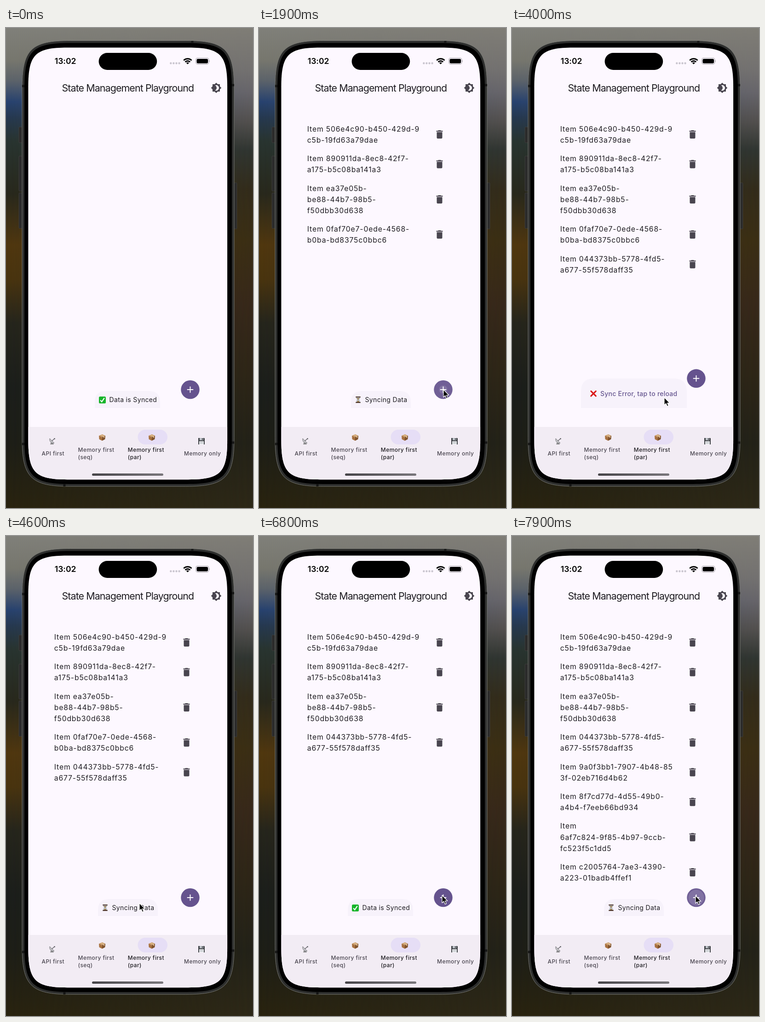
Write an HTML page that moves like this. It is 537 px wide and 1042 px high and loops after 8000 ms.

```html
<!DOCTYPE html>
<html lang="en">
<head>
<meta charset="utf-8">
<title>State Management Playground</title>
<style>
html, body { margin: 0; width: 100%; height: 100%; overflow: hidden; }
body {
  background: linear-gradient(#80807a 0, #77776e 70px, #5b626a 115px, #27426f 160px, #25384f 195px, #283430 245px,
    #28281c 360px, #50370f 470px, #49340f 545px, #25251c 640px, #1b1e1b 780px, #1d1e17 900px, #29230f 1042px);
}
#side {
  position: absolute; inset: 0;
  background: linear-gradient(#7f7d76 0, #737170 90px, #67656a 140px, #524f4d 205px, #303531 265px,
    #332c1b 350px, #3a2e14 460px, #37281a 600px, #2e2617 750px, #232218 900px, #2d2817 1042px);
  -webkit-mask-image: linear-gradient(90deg, transparent, #000);
  mask-image: linear-gradient(90deg, transparent, #000);
}
svg { position: absolute; left: 0; top: 0; display: block; }
text { font-family: Inter, "Open Sans", sans-serif; fill: #1d1b20; font-feature-settings: "calt" 0; }
.title { font-size: 21.4px; letter-spacing: -.89px; }
.clock { font-size: 17.5px; font-weight: 600; fill: #000; }
.item { font-size: 15.7px; letter-spacing: .86px; }
.note { font-size: 14px; letter-spacing: .34px; }
.link { font-size: 14px; letter-spacing: .24px; font-weight: 500; fill: #65558f; }
.tab { font-size: 12px; letter-spacing: .46px; font-weight: 500; fill: #49454f; }
.on { fill: #1d1b20; }
</style>
</head>
<body>
<div id="side"></div>
<svg width="537" height="1042" viewBox="0 0 537 1042">
  <defs>
    <linearGradient id="bar"><stop stop-color="#464448"/><stop offset="1" stop-color="#79767b"/></linearGradient>
    <path id="bin" d="M6 19c0 1.1.9 2 2 2h8c1.1 0 2-.9 2-2V7H6zM19 4h-3.5l-1-1h-5l-1 1H5v2h14z" fill="#49454f"/>
    <g id="box">
      <path d="M0 3 7 0 14 3 7 6.5z" fill="#c99a66"/>
      <path d="M0 3 7 6.5V14L.6 10.8z" fill="#a8713f"/>
      <path d="M14 3 7 6.5V14l6.4-3.2z" fill="#7d502b"/>
      <path d="M3 1.7 10 5v3l2-1V4L5 .9z" fill="#e3c49a"/>
    </g>
    <g id="done">
      <rect width="15" height="15" rx="2.5" fill="#18b52b"/>
      <path d="M3.2 8 6.2 11.6 11.8 3.2" fill="none" stroke="#fff" stroke-width="2.2"/>
    </g>
    <g id="wait">
      <path d="M2 1.5h8c0 3-1.5 4.5-3 5.5 1.5 1 3 2.5 3 5.5H2c0-3 1.5-4.5 3-5.5-1.5-1-3-2.5-3-5.5z" fill="#c3c9cb" stroke="#7d8587" stroke-width=".6"/>
      <path d="M3.2 3.5h5.6L6 7zM6 8.5l3.2 4H2.8z" fill="#96703a"/>
      <path d="M.8 0h10.4v2H.8zM.8 12h10.4v2H.8z" fill="#4a322a"/>
    </g>
    <path id="fail" d="M2 2 12.5 12.5M12.5 2 2 12.5" stroke="#db1717" stroke-width="3.1" stroke-linecap="round"/>
    <clipPath id="screen"><path id="glass"/></clipPath>
  </defs>

  <!-- phone body -->
  <g fill="#2b2b2b" stroke="#464644" stroke-width=".7">
    <rect x="28" y="215" width="9" height="34" rx="1.5"/>
    <rect x="28" y="278" width="9" height="76" rx="1.5"/>
    <rect x="28" y="358" width="9" height="77" rx="1.5"/>
    <rect x="494" y="336" width="8" height="100" rx="1.5"/>
  </g>
  <path id="frame" fill="#2d2e2d" stroke="#777873"/>
  <path d="M35 126h5M35 903h5M491 124h5M491 900h5M405 28v4M127 990v5" stroke="#151515" stroke-width="5"/>
  <path id="bezel"/>
  <g clip-path="url(#screen)">
    <path d="M48 42h434v939H48z" fill="#fdf8ff"/>
    <path d="M48 866h434v115H48z" fill="#f2ecf4"/>
  </g>

  <!-- status bar -->
  <text class="clock" x="105.8" y="78">13:02</text>
  <rect x="201.6" y="54" width="126.6" height="37" rx="18.5"/>
  <path d="M358.3 76.5h18.5" stroke="#c9c5ce" stroke-width="4.4" stroke-linecap="round" stroke-dasharray="0 6.1"/>
  <path d="M386.3 70.3a12.2 12.2 0 0 1 17.2 0M389.5 73.7a7.7 7.7 0 0 1 10.8 0" fill="none" stroke="#000" stroke-width="2.9"/>
  <path d="M394.9 78.8 391.8 75.7a4.4 4.4 0 0 1 6.2 0z"/>
  <rect x="412.6" y="65" width="28.4" height="13.6" rx="4.3" fill="none" stroke="#aaa6ad" stroke-width="1.1"/>
  <rect x="414.5" y="66.9" width="24.6" height="9.8" rx="2.7"/>
  <path d="M442 69.5q2 2.3 0 4.6z" fill="#aaa6ad"/>

  <!-- title bar -->
  <text class="title" x="121.5" y="138.3">State Management Playground</text>
  <path transform="translate(445 118)" fill="#49454f" d="M20 8.69V4h-4.69L12 .69 8.69 4H4v4.69L.69 12 4 15.31V20h4.69L12 23.31 15.31 20H20v-4.69L23.31 12zM12 18c-.89 0-1.74-.2-2.5-.55C11.56 16.5 13 14.42 13 12s-1.44-4.5-3.5-5.45C10.26 6.2 11.11 6 12 6c3.31 0 6 2.69 6 6s-2.69 6-6 6z"/>

  <!-- tabs -->
  <rect x="286.5" y="872" width="64.5" height="32" rx="16" fill="#e6def6"/>
  <use href="#box" x="202" y="882"/>
  <use href="#box" x="310" y="882"/>
  <g transform="translate(94 890)">
    <path d="M4 9 2 14h8L7 8z" fill="#8a8a8c"/>
    <path d="M1 1C-.5 7 4.5 12.5 11 11z" fill="#c4c4c8" stroke="#6c6c70" stroke-width=".8"/>
    <path d="M5.5 6.5 11.5 1.5" stroke="#55555a" stroke-width="1.2"/>
    <circle cx="11.5" cy="1.7" r="1.4" fill="#66666a"/>
  </g>
  <g transform="translate(418 890)">
    <path d="M0 0h13l1 1v13H0z" fill="#424549"/>
    <path d="M3 0h8v5H3z" fill="#b9bec4"/>
    <path d="M8 .8h2v3.2H8z" fill="#424549"/>
    <path d="M2 7h10v7H2z" fill="#eceef0"/>
    <path d="M3.5 9.2h7M3.5 11.4h7" stroke="#9aa0a6" stroke-width=".8"/>
  </g>
  <text class="tab" x="77.5" y="928">API first</text>
  <text class="tab" x="156.5" y="920">Memory first</text>
  <text class="tab" x="156.5" y="936">(seq)</text>
  <text class="tab on" x="264.8" y="920">Memory first</text>
  <text class="tab on" x="264.8" y="936">(par)</text>
  <text class="tab" x="387" y="928">Memory only</text>
  <rect x="187" y="967" width="155" height="5" rx="2.5" fill="url(#bar)"/>

  <g id="list"></g>
  <g id="chip"></g>
  <g id="fab">
    <circle r="20.2" fill="#65538e"/>
    <g id="ripple" fill="#fff">
      <circle r="20.2" opacity=".07"/>
      <circle id="wave" opacity=".12"/>
    </g>
    <path d="M-6.7 0H6.7M0-6.7V6.7" stroke="#fff" stroke-width="1.9"/>
  </g>
  <path id="cursor" d="M0 0V16.5L3.8 13 6.5 19.3 9.2 18.1 6.6 12H11.8z" stroke="#fff" stroke-width="1.2" stroke-linejoin="round"/>
</svg>
<script>
const $ = id => document.getElementById(id);
const LOOP = 8000, STEP = 100, LINE = 24.15;

// text, shown from, shown until
const items = [
  ["Item 506e4c90-b450-429d-9|c5b-19fd63a79dae", 1300],
  ["Item 890911da-8ec8-42f7-|a175-b5c08ba141a3", 1500],
  ["Item ea37e05b-|be88-44b7-98b5-|f50dbb30d638", 1700],
  ["Item 0faf70e7-0ede-4568-|b0ba-bd8375c0bbc6", 1900, 5600],
  ["Item 044373bb-5778-4fd5-|a677-55f578daff35", 2100],
  ["Item 9a0f3bb1-7907-4b48-85|3f-02eb716d4b62", 7400],
  ["Item 8f7cd77d-4d55-49b0-|a4b4-f7eeb66bd934", 7600],
  ["Item|6af7c824-9f85-4b97-9ccb-|fc523f5c1dd5", 7800],
  ["Item c2005764-7ae3-4390-|a223-01badb4ffef1", 7900]
];

const chips = {
  synced: { x: 193, w: 142, y: 788, icon: "done", ix: 202, tx: 224.5, cls: "note", text: "Data is Synced" },
  syncing: { x: 200, w: 130, y: 788, icon: "wait", ix: 209.5, tx: 230.5, cls: "note", text: "Syncing Data" },
  error: { x: 150, w: 230, y: 761, icon: "fail", ix: 169.8, tx: 192, cls: "link", text: "Sync Error, tap to reload" }
};
const states = [[0, "synced"], [1300, "syncing"], [3200, "error"], [4600, "syncing"], [5600, "synced"], [7400, "syncing"]];

// press time, hold
const taps = [[1150, 250], [1450, 250], [1650, 250], [1850, 250], [2050, 250], [7350, 250], [7450, 600]];

// time, x, y
const path = [
  [100, 30, 130], [400, 230, 760], [600, 400, 875], [800, 520, 760], [900, 512, 690], [1000, 440, 745], [1100, 401, 785],
  [3900, 401, 785], [4000, 331, 802], [4100, 302, 800], [4200, 290, 797],
  [6200, 290, 797], [6300, 350, 600], [6400, 440, 300], [6500, 489, 163], [6600, 470, 440], [6700, 425, 690],
  [6800, 398, 780], [7100, 399, 781]
];

// rectangle with corners that ease into the sides
function squircle(x, y, w, h, r) {
  const e = 1.53 * r, k = .272 * r, m = e - k, R = x + w, B = y + h;
  return `M${x + e} ${y}H${R - e}c${m} 0 ${e} ${k} ${e} ${e}V${B - e}c0 ${m} ${-k} ${e} ${-e} ${e}` +
    `H${x + e}c${-m} 0 ${-e} ${-k} ${-e} ${-e}V${y + e}c0 ${-m} ${k} ${-e} ${e} ${-e}z`;
}

const last = (list, t) => list.filter(e => e[0] <= t).pop();

function pointAt(t) {
  const a = last(path, t), b = path.find(p => p[0] > t);
  if (!a || !b) return a;
  const k = (t - a[0]) / (b[0] - a[0]);
  return a.map((v, i) => v + (b[i] - v) * k);
}

function listMarkup(t) {
  let top = 198.8, out = "";
  for (const [text, from, until = LOOP] of items) {
    if (t < from || t >= until) continue;
    const lines = text.split("|"), height = lines.length * LINE + 16.1;
    lines.forEach((s, i) => {
      out += `<text class="item" x="104.8" y="${top + 26 + i * LINE}">${s}</text>`;
    });
    out += `<use href="#bin" x="380.5" y="${top + height / 2 - 12}"/>`;
    top += height;
  }
  return out;
}

function chipMarkup(c) {
  const r = 825 - c.y > 50 ? 28 : 24, mid = (c.y + 825) / 2 + .7;
  return `<path d="M${c.x} 825V${c.y + r}q0-${r} ${r}-${r}h${c.w - 2 * r}q${r} 0 ${r} ${r}V825z" fill="#f7f2fb"/>
    <use href="#${c.icon}" x="${c.ix}" y="${mid - 7.3}"/>
    <text class="${c.cls}" x="${c.tx}" y="${mid + 5}">${c.text}</text>`;
}

function put(id, markup) {
  const el = $(id);
  if (el.markup !== markup) el.innerHTML = el.markup = markup;
}

function draw(now) {
  const t = Math.floor(now % LOOP / STEP) * STEP;
  const state = last(states, t)[1];
  put("list", listMarkup(t));
  put("chip", chipMarkup(chips[state]));
  $("fab").setAttribute("transform", `translate(400.5 ${state === "error" ? 760.8 : 785})`);

  const [press, hold] = last(taps, t) || [-LOOP, 0], age = t - press;
  $("wave").setAttribute("r", Math.min(17, (age + 70) / 13));
  $("ripple").setAttribute("opacity", Math.max(0, Math.min(1, 1 - (age - hold) / 200)));

  const p = pointAt(t);
  $("cursor").setAttribute("visibility", p ? "visible" : "hidden");
  if (p) $("cursor").setAttribute("transform", `translate(${p[1]} ${p[2]})`);
}

$("frame").setAttribute("d", squircle(35, 27.5, 461, 967.5, 69));
$("bezel").setAttribute("d", squircle(40, 32.5, 451, 957.5, 64));
$("glass").setAttribute("d", squircle(48.4, 42.4, 432.7, 937.8, 55.5));

const start = performance.now();
function tick() {
  draw(performance.now() - start);
  requestAnimationFrame(tick);
}
tick();
</script>
</body>
</html>
```
